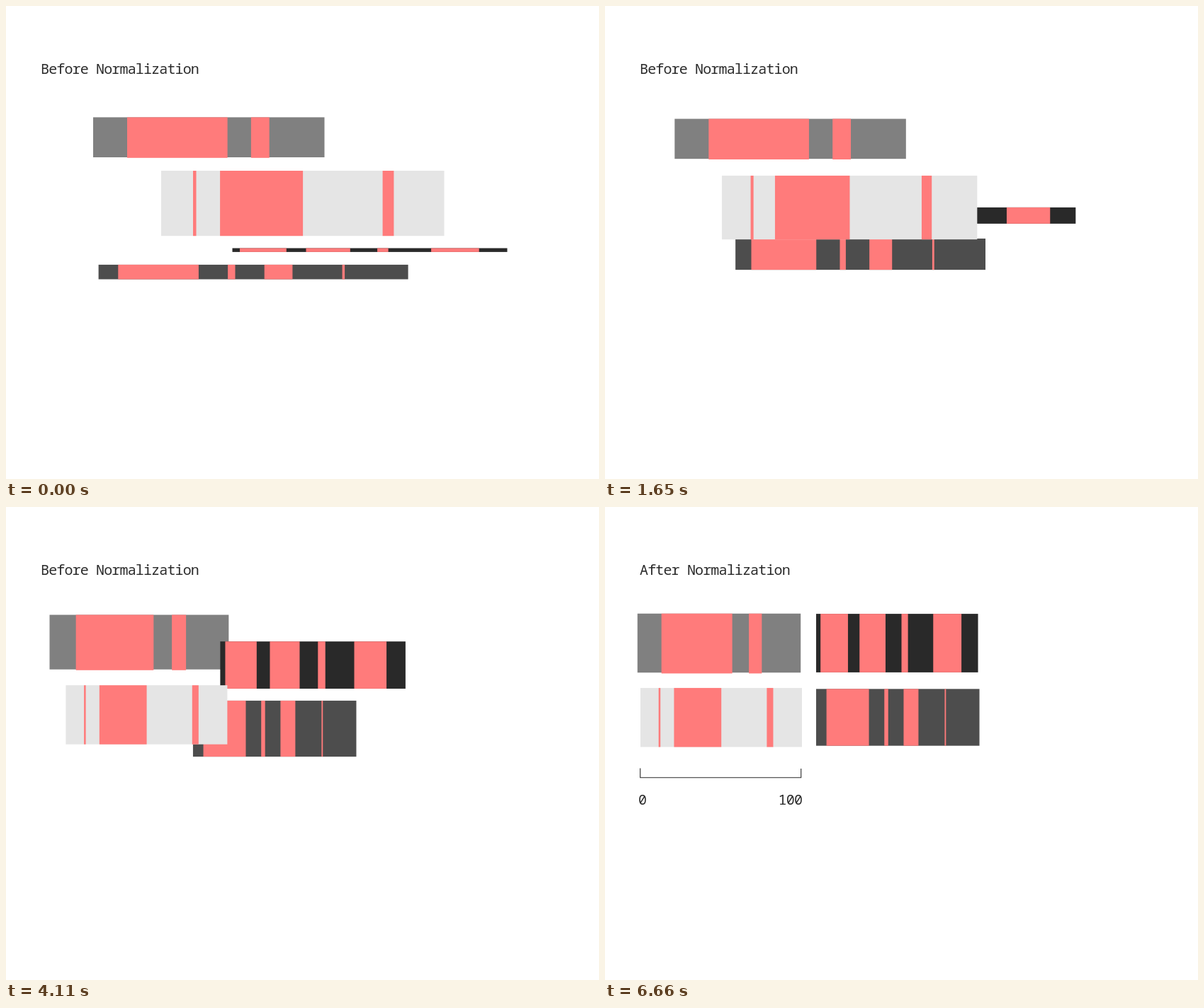
Animation of 837x669 px, one loop 8000 ms. Source, as an HTML page:

```html
<!DOCTYPE html>
<html lang="en">
<head>
<meta charset="utf-8">
<title>Normalization</title>
<style>
  html, body { margin: 0; width: 100%; height: 100%; overflow: hidden; background: #fff; }
  svg { display: block; width: 837px; height: 669px; }

  text {
    font: 300 20px "Noto Sans Mono", "DejaVu Sans Mono", monospace;
    letter-spacing: calc(11.15px - .6em);
    fill: #2b2b2b;
  }

  /* Each bar is drawn around its left-centre point. */
  .bar {
    translate: var(--from);
    animation: move 8s infinite, var(--size) 8s infinite;
  }
  .hit { fill: #ff7b7b; }

  .a { --from: 123px 185.7px;   --to: 45.8px 192.5px;  --size: size-a; fill: #808080; }
  .b { --from: 219px 279.1px;   --to: 50px 297.7px;    --size: size-b; fill: #e5e5e5; }
  .c { --from: 319.5px 345.2px; --to: 298px 192.5px;   --size: size-c; fill: #292929; }
  .d { --from: 130.6px 376.2px; --to: 298px 297.5px;   --size: size-d; fill: #4d4d4d; }
  .a rect { y: -28.3px; height: 56.6px; }
  .a .hit { height: 57.4px; }
  .b rect { y: -46.1px; height: 92.2px; }
  .c rect { y: -2.7px;  height: 5.4px; }
  .d rect { y: -10.3px; height: 20.6px; }

  @keyframes move {
    0% { translate: var(--from); animation-timing-function: steps(172); }
    64.5%, 100% { translate: var(--to); }
  }
  @keyframes size-a {
    0%, 34.125% { scale: 1 1; animation-timing-function: steps(60); }
    56.625%, 100% { scale: .7057 1.475; }
  }
  @keyframes size-b {
    0%, 15.75% { scale: 1 1; animation-timing-function: steps(57); }
    37.125%, 100% { scale: .5707 .906; }
  }
  @keyframes size-c {
    0%, 8.25% { scale: 1 1; animation-timing-function: steps(145); }
    62.625%, 100% { scale: .589 15.33; }
  }
  @keyframes size-d {
    0% { scale: 1 1; animation-timing-function: steps(135); }
    50.625% { scale: .5275 3.81; animation-timing-function: steps(5); }
    52.5%, 100% { scale: .5275 3.9; }
  }

  /* Hard switches */
  .before, .after, .digit { animation: 8s step-end infinite; }
  .before { animation-name: before; }
  .after  { animation-name: after; }
  .d0 { animation-name: zero; }
  .d1 { animation-name: one; }
  .d2 { animation-name: two; }
  .d3 { animation-name: three; }
  @keyframes before { 0% { opacity: 1 } 64.5%, 100% { opacity: 0 } }
  @keyframes after  { 0% { opacity: 0 } 64.5%, 100% { opacity: 1 } }
  @keyframes zero   { 0% { opacity: 0 } 74.25%, 100% { opacity: 1 } }
  @keyframes one    { 0% { opacity: 0 } 79.5%, 100% { opacity: 1 } }
  @keyframes two    { 0% { opacity: 0 } 81.375%, 100% { opacity: 1 } }
  @keyframes three  { 0% { opacity: 0 } 83.25%, 100% { opacity: 1 } }

  .scale {
    fill: none;
    stroke: #2b2b2b;
    stroke-width: 1.1;
    stroke-dasharray: 253 260;
    animation: draw 8s infinite;
  }
  @keyframes draw {
    0%, 66.375% { stroke-dashoffset: 254; animation-timing-function: steps(16); }
    72.375%, 100% { stroke-dashoffset: 0; }
  }
</style>
</head>
<body>
<svg viewBox="0 0 837 669">
  <text class="before" x="49" y="95.5">Before Normalization</text>
  <text class="after" x="49" y="95.5">After Normalization</text>

  <g class="bar d">
    <rect width="437"/>
    <rect class="hit" x="27.7" width="113.6"/>
    <rect class="hit" x="182.5" width="10.4"/>
    <rect class="hit" x="234.1" width="39.7"/>
    <rect class="hit" x="344" width="3.5"/>
  </g>
  <g class="bar a">
    <rect width="326.5"/>
    <rect class="hit" x="48" width="141.6"/>
    <rect class="hit" x="222.9" width="25.8"/>
  </g>
  <g class="bar c">
    <rect width="388"/>
    <rect class="hit" x="10.5" width="65.8"/>
    <rect class="hit" x="104" width="62.3"/>
    <rect class="hit" x="204.6" width="15.5"/>
    <rect class="hit" x="280.6" width="67.6"/>
  </g>
  <g class="bar b">
    <rect width="399.5"/>
    <rect class="hit" x="45" width="4.5"/>
    <rect class="hit" x="83.1" width="117"/>
    <rect class="hit" x="312.6" width="15.8"/>
  </g>

  <path class="scale" d="M49.7 369.5V382.7H276.7V369.5"/>
  <text class="digit d0" x="47" y="421.3">0</text>
  <text class="digit d1" x="244.6" y="421.3">1</text>
  <text class="digit d2" x="255.8" y="421.3">0</text>
  <text class="digit d3" x="267" y="421.3">0</text>
</svg>
</body>
</html>
```
